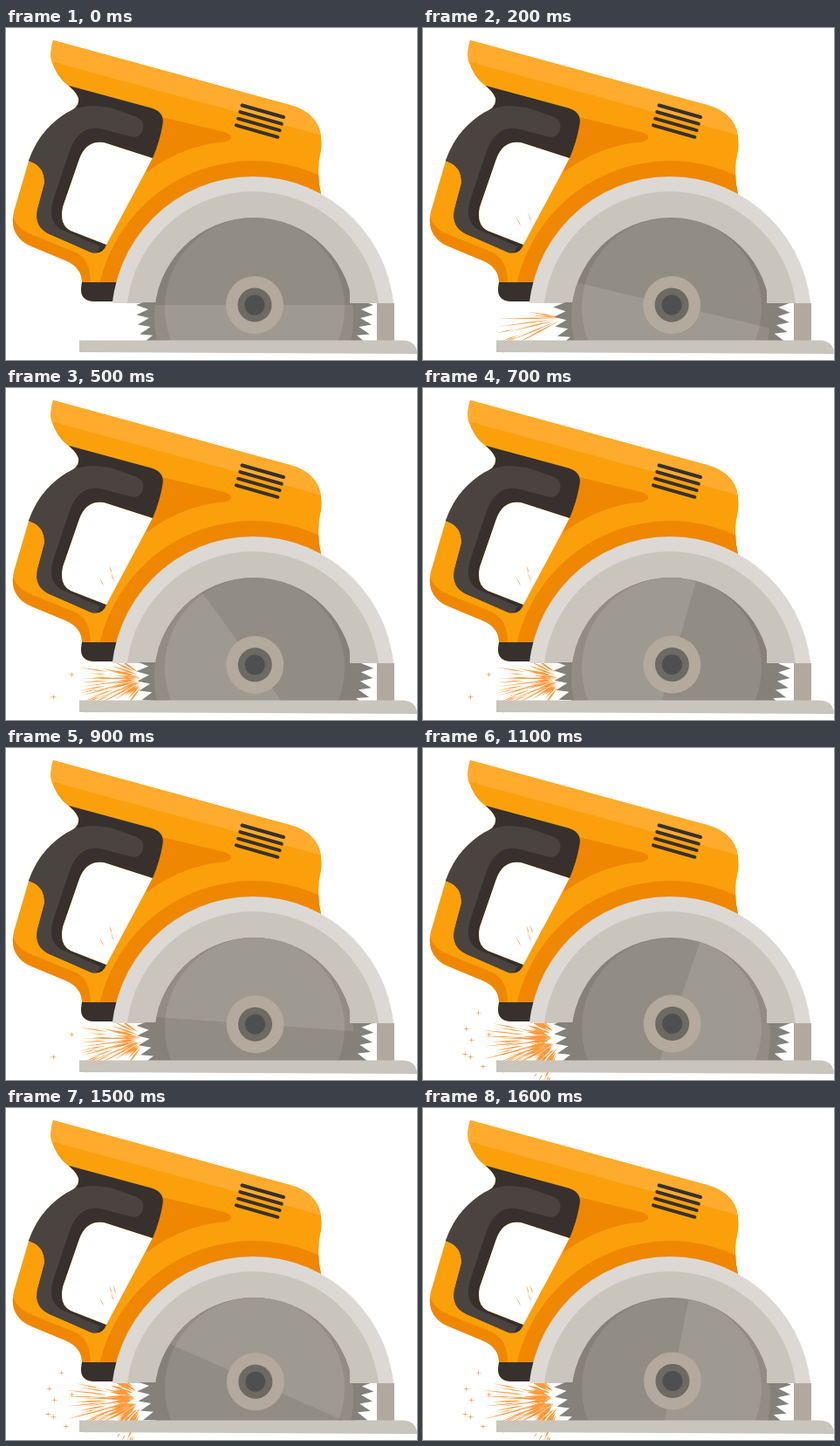
An HTML page for the animation above (1700 ms loop, 471x380 px).

```html
<!DOCTYPE html>
<html lang="en">
<head>
<meta charset="utf-8">
<title>Circular saw</title>
<style>
  html, body { margin: 0; width: 100%; height: 100%; overflow: hidden; background: #fff; }
  svg { display: block; width: 471px; height: 380px; }
  #sparks { fill: #fb9a3c; }
  #vents { stroke: #37302d; stroke-width: 4; stroke-linecap: round; }
</style>
</head>
<body>
<svg viewBox="0 0 471 380">
  <defs>
    <clipPath id="window"><circle cx="284" cy="331" r="114"/></clipPath>
    <clipPath id="above"><rect width="471" height="315"/></clipPath>
    <clipPath id="below"><rect y="314" width="471" height="45"/></clipPath>
    <clipPath id="top"><rect width="471" height="359"/></clipPath>
    <clipPath id="body"><path clip-rule="evenodd" d="M54 14L325 88Q366 99 361 140Q355 165 361 190L285 195L150 300L122 313L100 313Q86 312 86 299L87 291Q87 274 68 266L27 249Q3 237 9 210L26 152Q34 130 46 117Q58 104 70 97Q85 91 83 80Q79 71 70 65Q58 56 52 37Q50 28 54 14ZM112 131Q92 128 84 150L65 205Q61 226 74 232L115 248L168 149Z"/></clipPath>
  </defs>

  <g id="sparks"></g>

  <g clip-path="url(#body)">
    <rect width="400" height="330" fill="#fba00a"/>
    <path fill="#ffab2e" d="M40 0H380V128L268 97L40 35Z"/>
    <path fill="#ef8700" d="M178 102L250 119Q259 122 258 126Q256 131 244 131Q198 137 160 166L178 112Z"/>
    <circle cx="283" cy="332" r="180" fill="#ef8700"/>
    <path fill="#ef8700" d="M7 212Q10 228 28 236L78 256Q97 264 97 292H80L20 270L0 240Z"/>
    <path fill="#37302d" d="M72 66L168 92Q183 97 179 113Q176 130 168 149L112 131Q92 128 84 150L65 205Q61 226 74 232L115 248Q111 260 98 257L50 236Q32 228 36 208L44 178Q45 158 26 152Q20 120 55 102Q90 90 72 66Z"/>
    <path fill="#4a4441" d="M26 152Q20 115 55 102Q66 94 80 92Q100 86 125 93L150 102Q160 107 157 117Q153 127 142 124L112 116Q85 109 73 140L54 197Q47 222 64 231L108 250Q105 259 98 257L50 236Q32 228 36 208L44 178Q45 158 26 152Z"/>
    <rect x="84" y="291" width="45" height="25" fill="#37302d"/>
  </g>
  <g id="vents"></g>

  <g clip-path="url(#above)">
    <circle cx="283" cy="332" r="162" fill="#dcd9d4"/>
    <circle cx="283" cy="332" r="145" fill="#c9c5bd"/>
  </g>
  <g clip-path="url(#below)"><path class="spin" id="teeth" fill="#85807a"/></g>
  <g clip-path="url(#top)"><g clip-path="url(#window)">
    <rect x="160" y="210" width="250" height="150" fill="#918c84"/>
    <rect class="spin" x="-150" width="300" height="150" fill="#9f9a91"/>
    <path fill="#37302d" fill-opacity=".13" fill-rule="evenodd" d="M160 210H410V360H160ZM182 320a103 103 0 0 0 206 0a103 103 0 0 0 -206 0Z"/>
  </g></g>
  <path fill="#c9c5bd" d="M394 300H420V315H394Z"/>
  <g class="spin">
    <circle r="33" fill="#b3a99d"/>
    <circle r="19.500" fill="#6d6963"/>
    <circle r="11.500" fill="#4d4f50"/>
  </g>

  <rect x="425" y="315" width="20" height="44" fill="#b1a99e"/>
  <path fill="#c9c5bd" d="M84 357.500H456Q471 359 471 373L84 371Z"/>
</svg>
<script>
const LOOP = 1700, STEP = 100, RAD = Math.PI / 180;
const HUB = { x: 285, y: 317 }, CUT = { x: 162, y: 332 };
const $ = id => document.getElementById(id);

function addPath(parent, d, attrs = {}) {
  const el = document.createElementNS('http://www.w3.org/2000/svg', 'path');
  for (const [k, v] of Object.entries({ d, ...attrs })) el.setAttribute(k, v);
  parent.append(el);
  return el;
}

let seed = 17;
const rand = (a, b) => {
  seed = (seed * 16807) % 2147483647;
  return a + (b - a) * seed / 2147483647;
};

const polar = (c, deg, r) => ({ x: c.x + r * Math.cos(deg * RAD), y: c.y + r * Math.sin(deg * RAD) });

const poly = pts => 'M' + pts.map(p => `${p.x.toFixed(1)} ${p.y.toFixed(1)}`).join('L') + 'Z';

function star(c, points, outer, inner) {
  return poly(Array.from({ length: points * 2 }, (_, i) =>
    polar(c, i * 180 / points, i % 2 ? inner : outer)));
}

// Thin spike along a ray from the cut, widest in the middle
function spike(deg, from, to, width) {
  const mid = polar(CUT, deg, from * .6 + to * .4);
  return poly([polar(CUT, deg, from), polar(mid, deg + 90, width / 2),
    polar(CUT, deg, to), polar(mid, deg - 90, width / 2)]);
}

function burst(count, [a0, a1], from, [min, max], width) {
  let d = '';
  for (let i = 0; i < count; i++) {
    const start = from + rand(0, 8);
    const deg = a0 + (a1 - a0) * (i + rand(.1, .9)) / count;
    d += spike(deg, start, start + rand(min, max), width);
  }
  return d;
}

function twinkles(count) {
  let d = '';
  for (let i = 0; i < count; i++) {
    const deg = 158 + 40 * (i + rand(.2, .8)) / count;
    d += star(polar(CUT, deg, rand(85, 122)), 4, 4, .6);
  }
  return d;
}

// Each stage adds to the one before
const stages = [
  { start: 1, core: 0, d: burst(7, [150, 195], 4, [30, 75], 1.5)
    + burst(4, [150, 168], 55, [15, 25], 1.2) + burst(2, [242, 252], 110, [8, 14], .9) },
  { start: 5, core: 14, d: burst(18, [125, 218], 10, [18, 40], 2)
    + burst(8, [155, 192], 40, [18, 40], 1.2) + burst(1, [250, 256], 122, [8, 14], .9) + twinkles(2) },
  { start: 10, core: 24, d: burst(20, [115, 225], 18, [18, 34], 3.2)
    + burst(10, [148, 194], 46, [18, 48], 1.3) + burst(2, [252, 262], 118, [8, 14], .9)
    + burst(4, [105, 130], 46, [6, 12], 1.2) + twinkles(5) }
];
for (const s of stages) {
  s.els = [addPath($('sparks'), s.d)];
  if (s.core) s.els.push(addPath($('sparks'), star(CUT, 13, s.core, s.core * .6), { fill: '#fff' }));
}

for (let i = 0; i < 4; i++) addPath($('vents'), `M${270.5 - 2.2 * i} ${88.5 + 7.6 * i}l47.5 13.5`);
$('teeth').setAttribute('d', star({ x: 0, y: 0 }, 76, 136, 122));

const spinning = document.querySelectorAll('.spin');

function draw() {
  const step = Math.floor(performance.now() % LOOP / STEP);
  const p = step * STEP / LOOP;
  // Two turns, slow at first and fast at the end, with a slight lift
  const turn = 720 * p - 198 * Math.sin(Math.PI * p);
  const move = `translate(${HUB.x + p} ${HUB.y - 5.5 * p ** 3}) rotate(${turn})`;
  for (const el of spinning) el.setAttribute('transform', move);
  for (const { start, els } of stages)
    for (const el of els) el.style.display = step >= start ? '' : 'none';
  requestAnimationFrame(draw);
}
draw();
</script>
</body>
</html>
```
